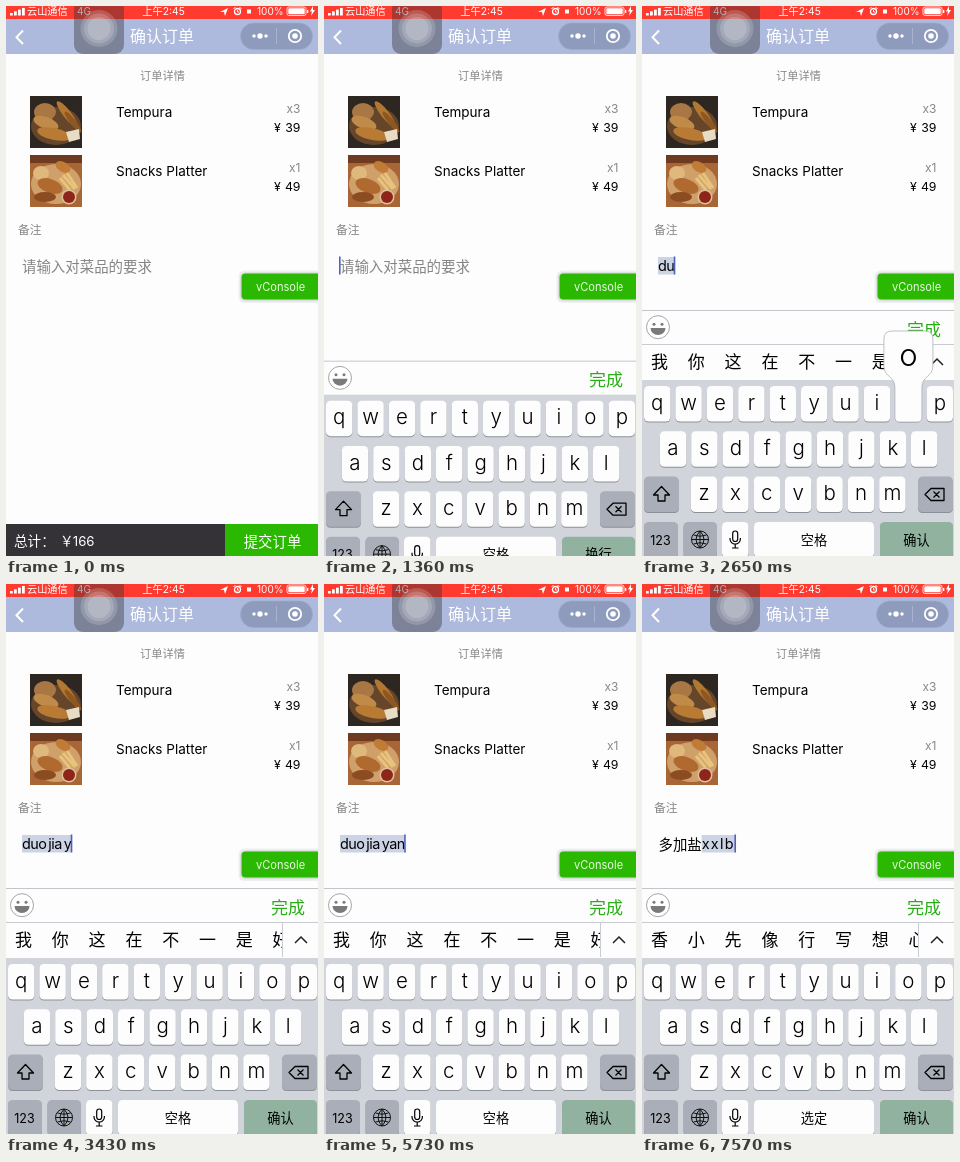
An HTML page that plays this animation: 312 by 550 pixels, repeating every 8 s.

```html
<!DOCTYPE html>
<html lang="zh">
<head>
<meta charset="utf-8">
<title>确认订单</title>
<style>
html, body { margin: 0; width: 100%; height: 100%; overflow: hidden; background: #fdfdfd; }
svg { display: block; }
text { font-family: Inter, "Noto Sans CJK SC", "Noto Sans CJK JP", sans-serif; white-space: pre; }
</style>
</head>
<body>
<svg id="stage" width="312" height="550" viewBox="0 0 312 550"></svg>
<script>
const GREEN = '#2ab900', GRAY = '#888';
const stage = document.getElementById('stage');

const text = (x, y, size, str, fill = '#000', anchor = 'start', more = '') =>
  `<text x="${x}" y="${y}" font-size="${size}" fill="${fill}" text-anchor="${anchor}" ${more}>${str}</text>`;
const rect = (x, y, w, h, fill, r = 0, more = '') =>
  `<rect x="${x}" y="${y}" width="${w}" height="${h}" rx="${r}" fill="${fill}" ${more}/>`;
const circle = (x, y, r, fill, more = '') => `<circle cx="${x}" cy="${y}" r="${r}" fill="${fill}" ${more}/>`;
const line = (d, color, w = 1.5, more = '') =>
  `<path d="${d}" fill="none" stroke="${color}" stroke-width="${w}" ${more}/>`;

// Header
const statusBar = () => rect(0, 0, 312, 13, '#ff3a2f') +
  [0, 1, 2, 3].map(i => rect(4 + i * 4, 7 - i * 1.7, 2.8, 2.5 + i * 1.7, '#fff')).join('') +
  text(21, 8.5, 10.2, '云山通信', '#fff') + text(71, 8.5, 10, '4G', '#fff') +
  text(157.5, 8.5, 10.3, '上午2:45', '#fff', 'middle') +
  '<path d="M214 6l8-4-3 8-1-4z" fill="#fff"/>' +
  circle(231.5, 5.5, 3, 'none', 'stroke="#fff" stroke-width="1.3"') +
  line('M227.5 3l2-2M235.5 3l-2-2M231.5 4v2h1.5', '#fff', 1) +
  rect(241, 3.5, 4, 4, '#fff') + text(251, 8.7, 10, '100%', '#fff') +
  rect(281, 1, 19, 8.5, 'none', 2, 'stroke="#fff" stroke-width=".8"') +
  rect(282.3, 2.3, 16.4, 5.9, '#fff', 1) + rect(301, 4, 1.3, 3, '#fff') +
  '<path d="M307 0l-3 5.5h2l-1 4.5 4-6h-2z" fill="#fff"/>';

const navBar = () => rect(0, 13, 312, 35, '#adb9dd') +
  line('M17 24.5L10.5 31.2L17 38', '#fff', 2) +
  text(156, 36, 16, '确认订单', '#fff', 'middle', 'font-weight="500"') +
  rect(234.5, 17, 72, 26.5, '#8e9bbd', 13.2, 'stroke="#a0abc9" stroke-width=".7"') +
  line('M270.5 22v16', '#a9b4d0', 1) +
  circle(248, 30, 1.7, '#fff') + circle(254, 30, 2.7, '#fff') + circle(260, 30, 1.7, '#fff') +
  circle(289, 30, 6.2, 'none', 'stroke="#fff" stroke-width="1.8"') + circle(289, 30, 2.8, '#fff');

const touchPad = () => rect(68, -6, 50, 54, '#333', 9, 'opacity=".4"') +
  [18.5, 15, 11.5].map(r => circle(93, 22.5, r, '#fff', 'opacity=".17"')).join('');

// Order page
const photo = (y, base, shapes) =>
  `<svg x="24" y="${y}" width="52" height="52">${rect(0, 0, 52, 52, base)}${shapes}</svg>`;
const blob = (x, y, rx, ry, fill, turn = 0) =>
  `<ellipse cx="${x}" cy="${y}" rx="${rx}" ry="${ry}" fill="${fill}" transform="rotate(${turn} ${x} ${y})"/>`;

const dish = (y, name, count, price) => text(110, y, 13.5, name) +
  text(294.5, y - 4, 12, count, GRAY, 'end') +
  text(268, y + 15, 12.3, '¥') + text(294.5, y + 15, 12.3, price, '#000', 'end');

const page = () => rect(0, 0, 312, 550, '#fdfdfd') + statusBar() + navBar() + touchPad() +
  text(156.5, 73.5, 11.2, '订单详情', GRAY, 'middle') +
  photo(90, '#2e2620',
    blob(26, 30, 25, 19, '#65462a') + blob(15, 16, 11, 9, '#a87743') + blob(16, 27, 13, 6, '#c08a49', 20) +
    blob(37, 18, 4, 16, '#b27730', -38) + blob(43, 26, 3, 13, '#8e5722', -38) +
    blob(24, 38, 17, 6, '#b97b34', 12) + '<path d="M36 36l13-3 1 10-11 3z" fill="#e8dcc5"/>') +
  photo(149, '#a86536',
    rect(0, 0, 52, 8, '#6f3b20') + blob(26, 29, 25, 20, '#d0a06a') + blob(11, 18, 8, 7, '#dfb87d') +
    blob(20, 31, 13, 7, '#b06a30', 20) + blob(33, 12, 8, 5, '#c07b36', 30) +
    line('M33 20l12 14M37 18l10 15M30 23l10 12', '#e8c37c', 3) +
    blob(15, 42, 11, 5, '#8b4c22') + circle(39, 42, 7.5, '#dcc0a0') + circle(39, 42, 6, '#8f2419')) +
  dish(111, 'Tempura', 'x3', '39') + dish(169.5, 'Snacks Platter', 'x1', '49') +
  text(12, 228, 11.8, '备注', GRAY);

const consoleButton = () => rect(232.5, 264.5, 84, 32.5, '#eef0ef', 6) + rect(234, 266.2, 84, 29, '#d8dedb', 5) +
  rect(235.5, 267.5, 80, 26, GREEN, 4) + text(274.5, 285, 11.1, 'vConsole', '#e9f7e5', 'middle');

const payBar = () => rect(0, 518, 312, 32, '#343236') + text(8, 539.5, 13.6, '总计：', '#fff') +
  text(54, 539.5, 13.6, '￥', '#fff') + text(88.5, 539.5, 13.2, '166', '#fff', 'end') +
  rect(219, 518, 93, 32, GREEN) + text(266.5, 540.5, 14.4, '提交订单', '#fff', 'middle');

// Keyboard, laid out at its open position
const STEP = 31.4, LIGHT = 'font-weight="300"', keys = {};
const key = (x, y, w, fill = '#fdfdfe') => rect(x, y + 1, w, 35.5, '#8c9098', 4.5) + rect(x, y, w, 35.5, fill, 4.5);
const letters = (row, x, y) => [...row].map((c, i) => {
  const cx = x + i * STEP;
  keys[c] = [cx, y];
  return key(cx - 13.2, y, 26.4) + text(cx, y + 23.6, 20.5, c, '#000', 'middle', LIGHT);
}).join('');

const keyboard = () => rect(0, 374, 312, 180, '#d1d4da') +
  letters('qwertyuiop', 15.2, 380) + letters('asdfghjkl', 31, 425.3) + letters('zxcvbnm', 62, 470.6) +
  key(2, 470.6, 35, '#a9aeb8') + key(276, 470.6, 35, '#a9aeb8') +
  line('M19.5 480.5l8 8.5h-4.5v6h-7v-6h-4.5z', '#000', 1.3, 'stroke-linejoin="round"') +
  line('M289 482.5h13v12h-13l-6-6zM291.5 485.5l6 6m0-6l-6 6', '#000', 1.3, 'stroke-linejoin="round"') +
  key(2, 516, 34, '#a9aeb8') + text(18.5, 538.5, 12.5, '123', '#000', 'middle') +
  key(41.5, 516, 33.5, '#a9aeb8') +
  line('M49.5 533.5a8.5 8.5 0 1 0 17 0a8.5 8.5 0 1 0-17 0zM58 525v17M49.5 533.5h17M51.5 529q6.5 2.5 13 0M51.5 538q6.5-2.5 13 0M58 525q-8 8.5 0 17q8-8.5 0-17', '#111', 1) +
  key(80, 516, 26.5) + rect(90.7, 525, 5, 10.5, 'none', 2.5, 'stroke="#000" stroke-width="1.2"') +
  line('M88 532v1a5.2 5.2 0 0 0 10.4 0v-1M93.2 538v4M90 542h6.5', '#000', 1.2) +
  key(112, 516, 120) + text(172, 538.5, 13.2, '空格', '#000', 'middle', 'id="space"') +
  key(238, 516, 73, '#90b29e') + text(274.5, 538.5, 13.2, '换行', '#000', 'middle', 'id="enter"');

const toolbar = () => rect(0, 0, 312, 35, '#fdfdfd') + line('M0 .5h312', '#c2c5cc', 1) +
  circle(16, 17.2, 11.5, '#fff', 'stroke="#a5a5a5" stroke-width="1"') +
  circle(12, 14.2, 1.5, '#7a7a7a') + circle(20, 14.2, 1.5, '#7a7a7a') +
  '<path d="M8.5 18h15a7.5 7 0 0 1-15 0z" fill="#7a7a7a"/>' +
  text(299, 25.8, 17, '完成', '#26ae14', 'end');

const suggestions = () => rect(0, 338, 312, 36, '#fdfdfd') + line('M0 338.5h312', '#c8cbd2', 1) +
  '<g id="words" clip-path="url(#wordArea)"></g><g id="more">' +
  line('M276.5 339v34', '#c9ccd2', 1) + line('M289 359l6-6l6 6', '#222', 1.5) + '</g>';

stage.innerHTML =
  '<defs><clipPath id="wordArea"><rect x="0" y="338" width="276" height="36"/></clipPath></defs>' +
  page() + '<g id="field"></g>' + consoleButton() + `<g id="pay">${payBar()}</g>` +
  `<g id="toolbar">${toolbar()}</g><g id="bar">${suggestions()}</g>` +
  `<g id="keyboard">${keyboard()}</g><g id="bubble"></g>`;

const el = id => document.getElementById(id);
const LISTS = {
  none: [],
  common: [...'我你这在不一是好'],
  salt: ['多加盐', '', '', '多加', '', '多', '夺', '朵'],
  x: [...'香小先像行写想心']
};

// time, committed text, pinyin, pressed key, suggestion list
const STATES = [
  [0, '', '', '', 'common'],
  [1870, '', '', 'd', 'common'],
  [1990, '', 'd', '', 'common'],
  [2400, '', 'd', 'u', 'common'],
  [2650, '', 'du', 'o', 'common'],
  [2800, '', 'duo', '', 'common'],
  [2920, '', 'duo', 'j', 'common'],
  [3040, '', 'duo j', 'i', 'common'],
  [3160, '', 'duo ji', 'a', 'common'],
  [3310, '', 'duo jia', 'y', 'common'],
  [3430, '', 'duo jia y', '', 'common'],
  [4370, '', 'duo jia y', 'a', 'common'],
  [4500, '', 'duo jia ya', '', 'common'],
  [4770, '', 'duo jia ya', 'n', 'common'],
  [4890, '', 'duo jia yan', '', 'common'],
  [5850, '', 'duo jia yan', '', 'salt'],
  [5970, '多加盐', '', '', 'none'],
  [6640, '多加盐', '', 'x', 'none'],
  [6760, '多加盐', 'x', '', 'x'],
  [6900, '多加盐', 'x', 'x', 'x'],
  [7020, '多加盐', 'xx', '', 'x'],
  [7190, '多加盐', 'xx', 'l', 'x'],
  [7310, '多加盐', 'xxl', '', 'x'],
  [7430, '多加盐', 'xxl', 'b', 'x'],
  [7570, '多加盐', 'xxlb', '', 'x']
];

function bubble(c) {
  if (!c) return '';
  const [x, y] = keys[c];
  return `<path d="M${x - 16.5} ${y - 55}h33q8 0 8 8v27c0 11-11 10-11 21v31q0 4-4 4h-19q-4 0-4-4v-31c0-11-11-10-11-21v-27q0-8 8-8z"
    fill="#fdfdfe" stroke="#aeb2bb" stroke-width=".8"/>` + text(x, y - 20, 31, c, '#000', 'middle', LIGHT);
}

function drawField(open, done, pinyin) {
  const field = el('field');
  if (!done && !pinyin) {
    field.innerHTML = text(16, 265.5, 14.45, '请输入对菜品的要求', '#858585') +
      (open ? rect(15, 250.5, 1.6, 18, '#4c62bd') : '');
    return;
  }
  const start = done ? 16.5 + done.length * 14.4 : 16;
  const spacing = done ? 'letter-spacing="1.3"' : 'letter-spacing="-.55" word-spacing="-1.5"';
  field.innerHTML = text(16.5, 265.5, 14.4, done) +
    rect(start, 251, 0, 17.5, '#cbd3e4', 0, 'id="mark"') +
    text(start, 265, 14.4, pinyin, '#000', 'start', `id="pinyin" ${spacing}`) +
    rect(0, 250.5, 1.6, 18, '#4c62bd', 0, 'id="caret"');
  const width = pinyin ? el('pinyin').getComputedTextLength() : 0;
  el('mark').setAttribute('width', width);
  el('caret').setAttribute('x', start + width - 0.5);
}

function draw(time) {
  const open = time >= 1120, predicting = time >= 1720;
  const frame = Math.floor((time - 1120) / 120);
  const shift = frame < 4 ? 163 * 0.3 ** frame : 0;
  const [, done, pinyin, pressed, list] = STATES.findLast(s => s[0] <= time);

  el('pay').style.display = open ? 'none' : '';
  for (const id of ['toolbar', 'keyboard']) el(id).style.display = open ? '' : 'none';
  el('bar').style.display = predicting ? '' : 'none';
  if (open) {
    el('keyboard').setAttribute('transform', `translate(0 ${shift})`);
    el('toolbar').setAttribute('transform', `translate(0 ${predicting ? 304 : 340 + shift})`);
  }
  el('words').innerHTML = LISTS[list].map((w, i) =>
    text(w.length > 1 ? 9 + i * 36.8 : 17.5 + i * 36.8, 362, 17, w, '#000', w.length > 1 ? 'start' : 'middle')).join('');
  el('more').style.display = list === 'none' ? 'none' : '';
  el('space').textContent = list === 'x' || list === 'salt' ? '选定' : '空格';
  el('enter').textContent = pinyin ? '确认' : '换行';
  el('bubble').innerHTML = bubble(pressed);
  drawField(open, done, pinyin);
}

const begin = performance.now();
function tick() {
  draw((performance.now() - begin) % 8000);
  requestAnimationFrame(tick);
}
tick();
</script>
</body>
</html>
```
